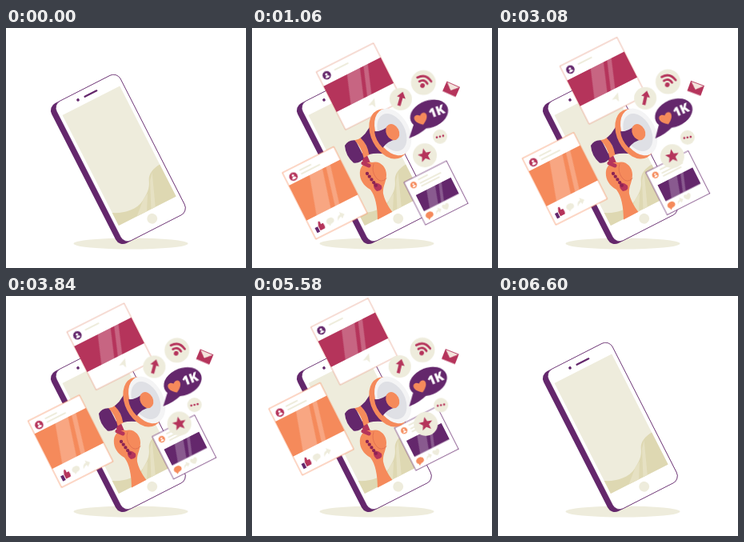
Write an HTML page that moves like this. It is 300 px wide and 300 px high and loops after 7280 ms.

```html
<!DOCTYPE html>
<html lang="en">
<head>
<meta charset="utf-8">
<title>Social media promotion</title>
<style>
  html, body { margin: 0; width: 100%; height: 100%; overflow: hidden; background: #fff; }
  svg { display: block; width: 100vw; height: 100vh; }
  .purple { fill: #64276c; }
  .red { fill: #b5345b; }
  .orange { fill: #f58a5b; }
  .cream { fill: #eeecdc; }
  .white { fill: #fff; }
  .line { fill: none; stroke-linecap: round; stroke-linejoin: round; }
  .text { stroke: #eeecdc; stroke-width: 2; }
  .glare { fill: #fff; opacity: .24; }

  /* Cards travel along the long axis of the phone. --k scales the slow drift. */
  .card { animation: 7.28s linear infinite; }
  .side { animation-name: side; }
  .top { animation-name: top; --k: .38; }
  .left { --k: 1; }
  .right { --k: .7; }
  .side, .top {
    --in: translate(calc(1.3px * var(--k)), calc(3.1px * var(--k)));
    --out: translate(calc(-18.3px * var(--k)), calc(-43.2px * var(--k)));
  }
  @keyframes side {
    0%, .27% { transform: var(--in) translate(17px, 37px); opacity: 0; animation-timing-function: ease-out; }
    9.6% { transform: var(--in); opacity: 1; }
    81.5% { transform: var(--out); opacity: 1; animation-timing-function: ease-in; }
    90.6%, 100% { transform: var(--out) translate(-16px, -35px); opacity: 0; }
  }
  @keyframes top {
    0%, 6% { transform: var(--in) translate(13px, 27px); opacity: 0; animation-timing-function: ease-in-out; }
    13.7% { transform: var(--in); opacity: 1; }
    81.5% { transform: var(--out); opacity: 1; animation-timing-function: ease-in; }
    90.6%, 100% { transform: var(--out) translate(-16px, -35px); opacity: 0; }
  }

  .rise { animation: rise 7.28s linear infinite; }
  @keyframes rise {
    0%, .27% { transform: translate(17px, 36px); opacity: 0; animation-timing-function: ease-out; }
    8.8%, 82.5% { transform: none; opacity: 1; animation-timing-function: ease-in; }
    90.6%, 100% { transform: translate(17px, 36px); opacity: 0; }
  }

  .pop { animation: pop 7.28s calc(var(--d) * 1s) linear infinite backwards; }
  @keyframes pop {
    0%, 4% { transform: scale(0); animation-timing-function: ease-out; }
    9%, 81.6% { transform: scale(1); animation-timing-function: ease-in; }
    87%, 100% { transform: scale(0); }
  }

  .sway { animation: sway 1.82s -.92s ease-in-out infinite alternate; }
  .back { animation-direction: alternate-reverse; }
  @keyframes sway {
    from { transform: translate(-1px, -.6px) rotate(-2deg); }
    to { transform: translate(1px, .6px) rotate(2deg); }
  }
</style>
</head>
<body>
<svg viewBox="0 0 300 300">
  <defs>
    <clipPath id="screen"><path d="M71 109 141 0H300V165L213 210 141 248Z"/></clipPath>
    <g id="face">
      <circle r="5.3"/>
      <circle class="white" cy="-1.4" r="1.5"/>
      <path class="white" d="M-3 2.7Q-2 .3 0 .3T3 2.7Q0 4.2-3 2.7Z"/>
    </g>
    <path id="chat" d="M0-4.3C7-4.3 7 3.6 0 3.6L-3 5.2-3 3C-6.5 0-4.5-4.3 0-4.3Z"/>
    <path id="plane" d="M-5 0 6-5 2 6 0 1Z"/>
    <path id="share" d="M-5 4Q-4-2 1-2V-5L6 0 1 4V1Q-2 1-5 4Z"/>
    <path id="heart" d="M0 7C-15-2-6-12 0-5 6-12 15-2 0 7Z"/>
  </defs>

  <ellipse class="cream" cx="156" cy="269.5" rx="71.5" ry="7"/>

  <g transform="translate(72 99.8) rotate(-27)">
    <rect class="purple" x="-16.8" y="-10" width="97" height="196.4" rx="10"/>
    <rect class="white" x="-9.8" y="-9.7" width="89.6" height="195.8" rx="9.8" stroke="#64276c" stroke-width=".6"/>
    <path class="cream" d="M-5.5 7.5H75V162.5H-5.5Z"/>
    <path fill="#ded8b2" d="M-5.5 144.5C5 151 23 156 36 148S51 136 54 129 65 118 75 117.5V162.5H-5.5Z"/>
    <path fill="#e6e1c3" d="M37 147 45 143 34 162.5H20ZM55 130 62 122 46 162.5H40Z"/>
    <circle class="cream" cx="35.8" cy="173.6" r="6.4"/>
    <circle class="purple" cx="20.5" cy="-.6" r="1.8"/>
    <path class="line" d="M30-.4H46.5" stroke="#64276c" stroke-width="2.3"/>
  </g>

  <g class="card top">
    <g transform="translate(80 54) rotate(-26.8)">
      <rect class="white" width="80" height="81" stroke="#e59a83" stroke-width=".7"/>
      <use href="#face" class="purple" x="9.8" y="9.6"/>
      <path class="line text" d="M22 8H40"/>
      <path class="red" d="M0 20H80V56H0Z"/>
      <path class="glare" d="M33 20H51L38 56H20ZM56 20H62L49 56H43Z"/>
      <use href="#plane" class="cream" x="44" y="67"/>
    </g>
  </g>

  <g class="card side left">
    <g transform="translate(38 181) rotate(-26.8)">
      <rect class="white" width="72" height="93" stroke="#f58a5b" stroke-width=".7"/>
      <use href="#face" class="red" x="10.2" y="10.5"/>
      <path class="line text" d="M21 7H36M21 12H46"/>
      <path class="orange" d="M0 18H72V67H0Z"/>
      <path class="glare" d="M29 18H47L34 67H14ZM52 18H58L46 67H40Z"/>
      <g transform="translate(11 81)">
        <path class="red" d="M-1-1 1-6Q4-7 3-2H6Q7 4 5 5H-1Z"/>
        <path class="purple" d="M-6-1H-2V6H-6Z"/>
      </g>
      <use href="#chat" class="cream" x="26" y="81"/>
      <use href="#share" class="cream" x="40" y="81"/>
    </g>
  </g>

  <g class="card side right">
    <g transform="translate(190 193) rotate(-26.8)">
      <rect class="white" width="59.7" height="59.7" stroke="#64276c" stroke-width=".7"/>
      <use href="#face" class="orange" transform="translate(9.3 8.4) scale(.78)"/>
      <path class="line text" stroke-width="1.6" d="M18 5H30M18 10H46M18 14H42"/>
      <path class="purple" d="M6 21H55V43.5H6Z"/>
      <path class="glare" d="M21 21H33L26 43.5H14ZM38 21H42L34 43.5H30Z"/>
      <use href="#chat" class="orange" x="10" y="51"/>
      <use href="#share" class="cream" transform="translate(22 51) scale(.8)"/>
      <use href="#heart" class="cream" transform="translate(33 51) scale(.55)"/>
    </g>
  </g>

  <g class="rise">
    <path class="line" d="M140 160 157 199" stroke="#b5345b" stroke-width="8"/>
    <g transform="translate(174 131) rotate(-27)">
      <path class="purple" d="M-44-12V12Q-52 17-59 12-64 0-59-12-52-17-44-12Z"/>
      <path class="orange" d="M-45-12.5Q-39-11-35-12V12Q-39 12-45 12.5Q-41 0-45-12.5Z"/>
      <path class="purple" d="M-37-11.5Q-21-15-6-32V32Q-21 15-37 11.5Q-33 0-37-11.5Z"/>
      <ellipse class="orange" cx="-3" rx="22.5" ry="33"/>
      <ellipse cx="2.4" rx="20.5" ry="31.2" fill="#f4f4f5"/>
      <ellipse cx="1" rx="16.5" ry="25" fill="#dfe0e5"/>
      <path class="purple" d="M-18-11Q-8-6 2-10V10Q-8 7-18 12Q-22 0-18-11Z"/>
      <ellipse class="orange" cx="2" rx="8" ry="10.5"/>
    </g>
  </g>
  <g clip-path="url(#screen)">
    <g class="rise">
      <path class="orange" d="M157 243C157 222 154 210 148 202 138 196 134 188 135 179 136 172 142 167 150 168 160 165 168 174 168 183 168 193 163 198 164 207 167 220 174 228 183 240L180 260H160Z"/>
      <path class="red" d="M152 194Q157 192 162 197 164 203 156 204 151 200 152 194Z"/>
      <path class="line" d="M144 182 155 197" stroke="#8c2453" stroke-width="4.3" stroke-dasharray="0 4.6"/>
      <path class="line" d="M152 170Q149 179 155 187T168 188" stroke="#dd6d50" stroke-width=".8"/>
    </g>
    <g class="rise">
      <path class="line" d="M139 169 146 172" stroke="#b5345b" stroke-width="5"/>
    </g>
  </g>

  <g transform="translate(217 159.8)"><g class="pop" style="--d:.2"><g class="sway back">
    <circle class="cream" r="15"/>
    <path class="red" transform="rotate(-12)" d="M0-9 2.4-3 8.6-2.8 3.8 1.2 5.3 7.3 0 3.9-5.3 7.3-3.8 1.2-8.6-2.8-2.4-3Z"/>
  </g></g></g>

  <g transform="translate(185 88.3)"><g class="pop" style="--d:0"><g class="sway">
    <circle class="cream" r="14"/>
    <path class="red" transform="rotate(14)" d="M0-9.5 5.6-2H2V8.5H-2V-2H-5.6Z"/>
  </g></g></g>

  <g transform="translate(213.3 67.6)"><g class="pop" style="--d:.1"><g class="sway">
    <circle class="cream" r="15.5"/>
    <g transform="rotate(14)">
      <circle class="red" cx="0" cy="4" r="2.9"/>
      <path class="line" d="M-5.2 0Q0-5 5.2 0M-9-4Q0-12 9-4" stroke="#b5345b" stroke-width="2.8"/>
    </g>
  </g></g></g>

  <g transform="translate(248 76)"><g class="pop" style="--d:.2"><g class="sway">
    <g transform="rotate(22)">
      <path class="red" d="M-9-6.5H9V6.5H-9Z"/>
      <path d="M-9-6.5H9L0 2Z" fill="#f3e4dc" stroke="#b5345b" stroke-width=".8"/>
    </g>
  </g></g></g>

  <g transform="translate(236 136.3)"><g class="pop" style="--d:.25"><g class="sway back">
    <circle class="cream" r="9"/>
    <path class="line" d="M-4 .8 4-.8" stroke="#b5345b" stroke-width="2.7" stroke-dasharray="0 4.05"/>
  </g></g></g>

  <g transform="translate(220.5 107)"><g class="pop" style="--d:.05"><g class="sway">
    <path class="purple" d="M-19 14-24 31Q-11 26-2 17Z"/>
    <g transform="rotate(-22)">
      <ellipse class="purple" rx="24.5" ry="17"/>
      <use href="#heart" class="orange" transform="translate(-11.5 3) scale(.98)"/>
      <text class="white" x="10" y="5.5" text-anchor="middle" font-family="'Open Sans', Inter, sans-serif" font-size="16" font-weight="800">1K</text>
    </g>
  </g></g></g>
</svg>
</body>
</html>
```
